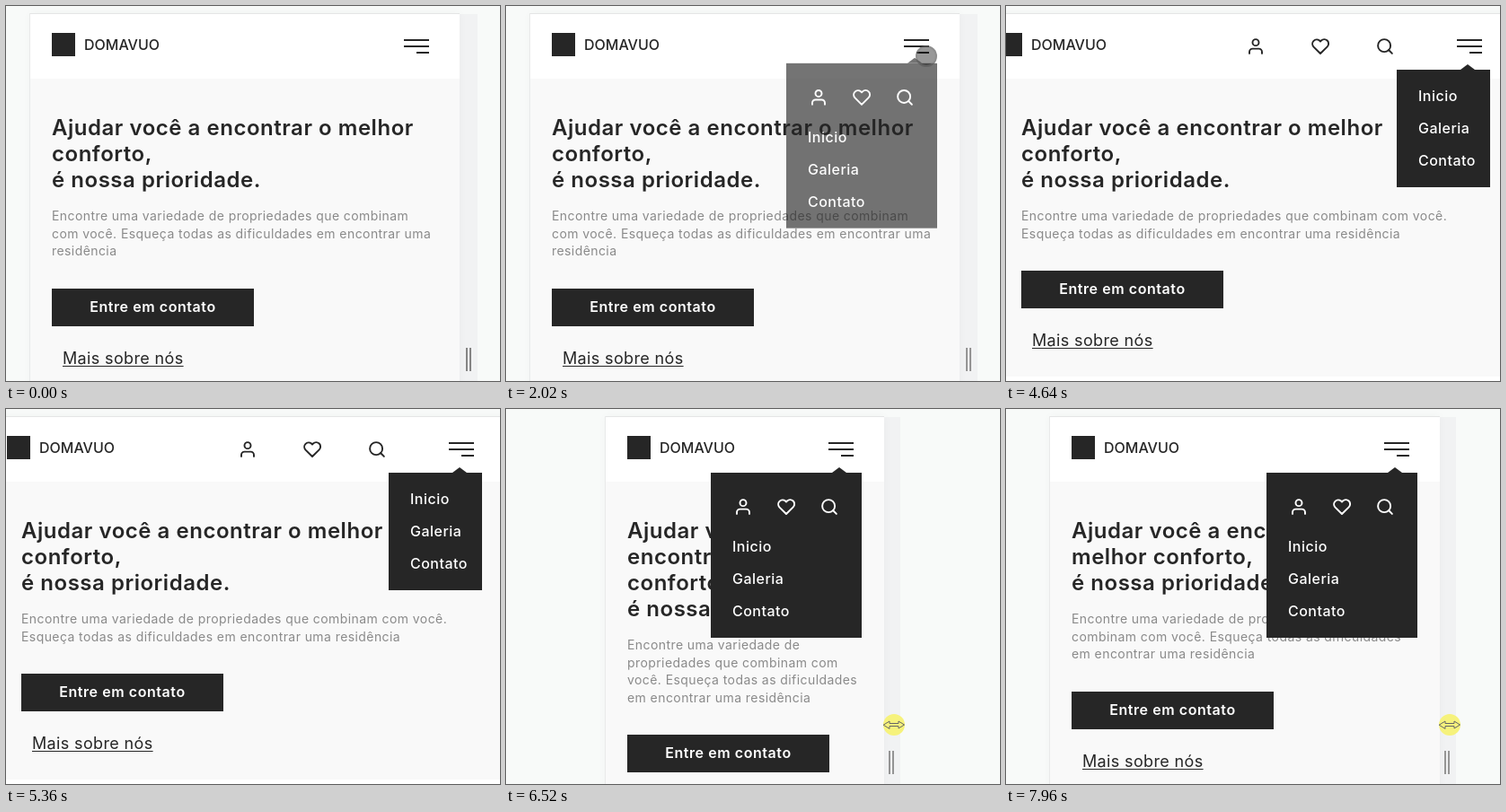
An HTML page for the animation above (8000 ms loop, 550 px wide and 418 px high).

```html
<!DOCTYPE html>
<html lang="pt-BR">
<head>
<meta charset="utf-8">
<title>Menu responsivo</title>
<style>
  * { box-sizing: border-box; margin: 0; padding: 0; }
  html, body { width: 100%; height: 100%; overflow: hidden; }
  body {
    position: relative; background: #f8faf9; color: #262626;
    font: 500 16px Inter, "Open Sans", sans-serif;
  }
  svg {
    display: block; width: 24px; height: 24px; fill: none; stroke: currentColor;
    stroke-width: 2.2; stroke-linecap: round; stroke-linejoin: round;
  }
  #strip { position: absolute; top: 9px; bottom: 0; width: 40px; background: #f1f2f3; }
  #handle {
    position: absolute; top: 381px; width: 6px; height: 26px;
    border: solid; border-width: 0 2px;
  }
  #page {
    position: absolute; top: 8px; height: 420px; background: #fff;
    border-top: 1px solid #e4e5e5; box-shadow: -1px 0 #e9eaea, 0 0 10px rgba(0, 0, 0, .035);
  }
  header { position: relative; height: 72px; }
  .mark { position: absolute; left: 24px; top: 21px; width: 26px; height: 26px; background: #262626; }
  .brand { position: absolute; left: 60px; top: 24px; line-height: 20px; }
  .burger { position: absolute; right: 34px; top: 28px; width: 28px; }
  .burger i { display: block; height: 2px; margin: 0 0 5px auto; background: #262626; }
  .burger i:last-child { width: 14px; }
  .icons { display: flex; }
  .icons svg { padding: 1.5px; }
  header .icons { position: absolute; right: 130px; top: 24px; gap: 48px; }

  main { height: 340px; background: #f9f9f9; overflow: hidden; }
  .wide main { height: auto; }
  .content { width: calc(100% - 48px); max-width: 498px; margin: auto; padding: 40px 3px 29px 0; }
  h1 { font-size: 24px; font-weight: 600; line-height: 29px; letter-spacing: .022em; }
  p {
    margin: 16px 0 32px; color: #8a8a8a;
    font-size: 14px; font-weight: 400; line-height: 19.6px; letter-spacing: .03em;
  }
  .button {
    width: 225px; height: 42px; background: #262626; color: #fff; font-weight: 600;
    line-height: 41px; letter-spacing: .035em; text-align: center;
  }
  .link {
    display: block; width: max-content; margin: 25px 0 0 12px; font-size: 18px; font-weight: 400;
    line-height: 22px; letter-spacing: .02em; text-decoration: underline; text-underline-offset: 2px;
  }

  #menu {
    position: absolute; right: 25px; top: 62px; width: 168px; padding: 11px 24px 12px;
    background: #262626; color: #fff; line-height: 36px; letter-spacing: .03em;
  }
  #menu::before {
    content: ""; position: absolute; right: 17px; top: -6px;
    border: solid transparent; border-width: 0 8px 6px; border-bottom-color: #262626;
  }
  #menu .icons { gap: 24px; margin: 15px 0 14px; }
  .wide #menu { width: 104px; padding-right: 0; }
  .wide #menu .icons, #page:not(.wide) header .icons { display: none; }

  #cursor {
    position: absolute; left: -12px; top: -12px; width: 24px; height: 24px; border-radius: 50%;
    background: rgba(10, 10, 10, .42); border: 2px solid rgba(130, 130, 130, .45);
  }
  #cursor svg { display: none; stroke: #666; stroke-width: 1; }
  #cursor.resize { background: #f6f27c; border: 0; }
  #cursor.resize svg { display: block; }
</style>
</head>
<body>
<svg style="display:none">
  <symbol id="user" viewBox="0 0 24 24"><path d="M20 21v-2a4 4 0 0 0-4-4H8a4 4 0 0 0-4 4v2"/><circle cx="12" cy="7" r="4"/></symbol>
  <symbol id="heart" viewBox="0 0 24 24"><path d="M20.8 4.6a5.5 5.5 0 0 0-7.7 0L12 5.7l-1.1-1.1a5.5 5.5 0 0 0-7.7 7.8L12 21.2l8.8-8.8a5.5 5.5 0 0 0 0-7.8z"/></symbol>
  <symbol id="search" viewBox="0 0 24 24"><circle cx="11" cy="11" r="8"/><path d="M21 21l-4.4-4.4"/></symbol>
</svg>

<div id="strip"></div>
<div id="handle"></div>

<div id="page">
  <header>
    <div class="mark"></div>
    <div class="brand">DOMAVUO</div>
    <div class="icons"></div>
    <div class="burger"><i></i><i></i><i></i></div>
  </header>
  <main>
    <div class="content">
      <h1>Ajudar você a encontrar o melhor conforto,<br>é nossa prioridade.</h1>
      <p>Encontre uma variedade de propriedades que combinam com você. Esqueça todas as dificuldades em encontrar uma residência</p>
      <div class="button">Entre em contato</div>
      <span class="link">Mais sobre nós</span>
    </div>
  </main>
  <nav id="menu">
    <div class="icons"></div>
    <div>Inicio</div>
    <div>Galeria</div>
    <div>Contato</div>
  </nav>
</div>

<div id="cursor"><svg viewBox="0 0 24 24"><path d="M.5 12 7 8v2.5h10V8l6.5 4-6.5 4v-2.5H7V16z"/></svg></div>

<script>
const LOOP = 8000, CENTER = 266, BREAKPOINT = 576, LAYOUT_LAG = 15;
const [strip, handle, page, menu, cursor] =
  ['strip', 'handle', 'page', 'menu', 'cursor'].map(id => document.getElementById(id));

for (const row of document.querySelectorAll('.icons'))
  row.innerHTML = ['user', 'heart', 'search']
    .map(id => `<svg viewBox="0 0 24 24"><use href="#${id}"/></svg>`).join('');

// [time, viewport width]
const widths = [
  [4060, 478], [4250, 520], [4640, 598], [4830, 614], [4970, 614], [5300, 585],
  [5750, 508], [5880, 477], [6520, 306], [6590, 292], [6660, 292],
  [6900, 360], [7420, 532], [7660, 532], [7960, 430]
];

// [time, x, y]
const moves = [
  [590, 516, 401], [1350, 473, 66], [1490, 468, 56], [2200, 468, 56], [2600, 367, 162],
  [3190, 367, 162], [3390, 520, 406], [3450, 521, 372], [3650, 529, 330],
  [3800, 524, 305], [3940, 519, 318], [4060, 517, 350],
  [5750, 517, 359], [5900, 517, 359], [6520, 517, 352]
];

const smooth = k => k * k * (3 - 2 * k);

function sample(track, t, ease = k => k) {
  const next = track.findIndex(step => step[0] > t);
  if (next === 0) return track[0].slice(1);
  if (next < 0) return track[track.length - 1].slice(1);
  const [t0, ...a] = track[next - 1], [t1, ...b] = track[next];
  const k = ease((t - t0) / (t1 - t0));
  return a.map((v, i) => v + (b[i] - v) * k);
}

const opening = menu.animate(
  [{ opacity: 0, transform: 'translateY(-20px)' }, { opacity: 1, transform: 'none' }],
  { duration: 540, easing: 'ease', fill: 'both' }
);
opening.pause();

function draw(t) {
  const [outer] = sample(widths, t);
  const inner = Math.round(sample(widths, t - LAYOUT_LAG)[0] / 2) * 2;
  const edge = Math.round(CENTER + outer / 2);

  strip.style.left = edge - 20 + 'px';
  handle.style.left = edge + 7 + 'px';
  handle.style.borderColor = t < 330 ? '#858585' : '#959595';

  page.style.left = CENTER - inner / 2 + 'px';
  page.style.width = inner + 'px';
  page.classList.toggle('wide', inner >= BREAKPOINT);
  opening.currentTime = Math.max(0, t - 1820);

  const [mx, y] = sample(moves, t, smooth);
  const x = t < 4060 ? mx : edge + 13;
  cursor.style.visibility = t < 590 ? 'hidden' : 'visible';
  cursor.style.transform = `translate(${x}px, ${y}px)`;
  cursor.classList.toggle('resize', x > edge);
}

const start = performance.now();
function tick() {
  draw((performance.now() - start) % LOOP);
  requestAnimationFrame(tick);
}
tick();
</script>
</body>
</html>
```
